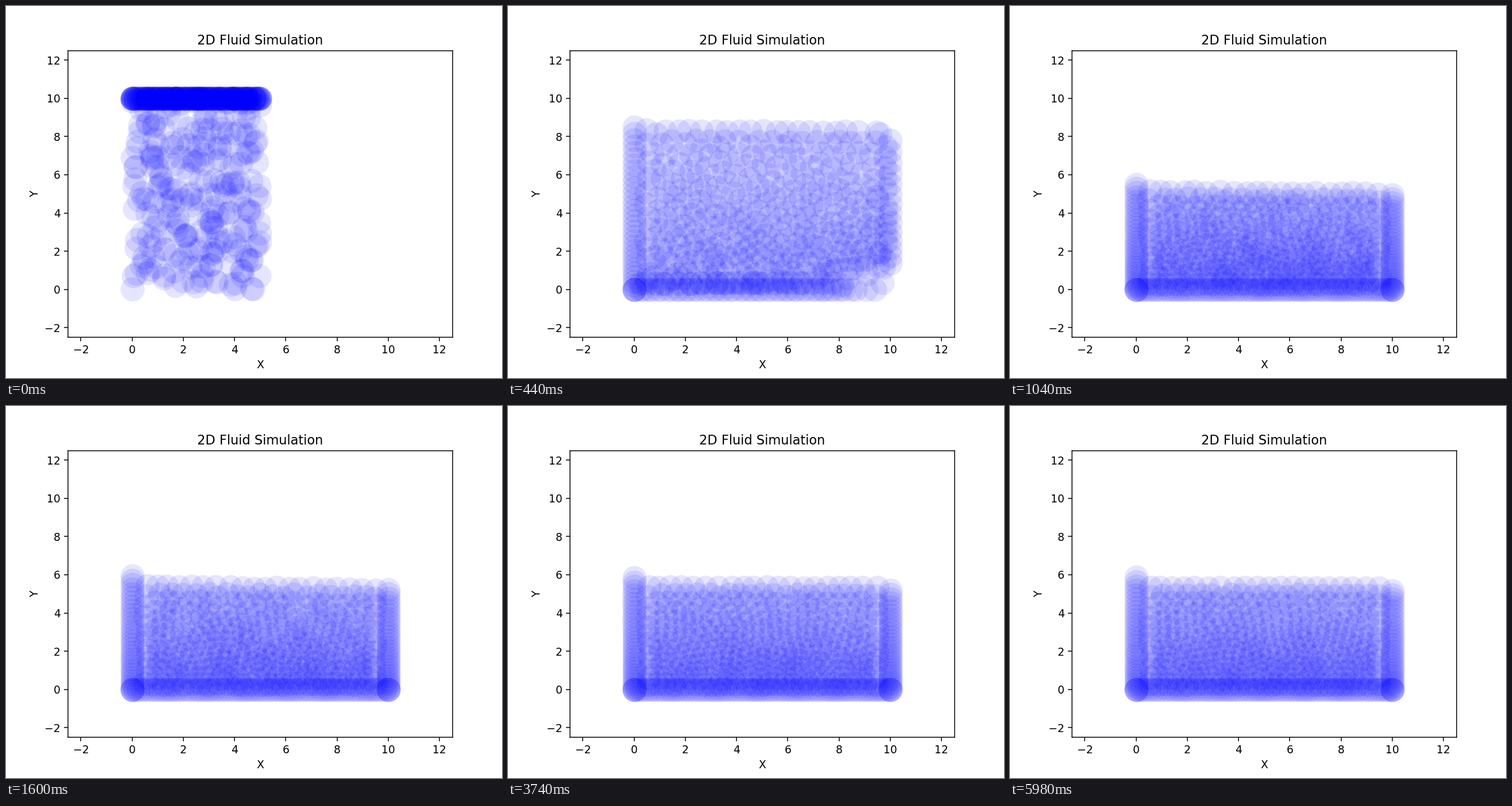
Animation of 864x648 px, one loop 6000 ms. Source, as a matplotlib script:

```python
import numpy as np
import matplotlib.pyplot as plt
from matplotlib.animation import FuncAnimation

FRAMES, INTERVAL = 300, 20
BURST = 11            # frames until the fluid has filled the tank
rng = np.random.default_rng(7)

# Heights over time: fluid surface at both sides, and the two wall columns.
TIMES = np.array([0, 11, 22, 35, 46, 62, 80, 138, 239, 299])
SURFACE_L = np.array([9.4, 9.3, 8.3, 6.4, 5.15, 5.55, 5.4, 5.35, 5.33, 5.32])
SURFACE_R = np.array([9.3, 9.3, 8.2, 5.75, 4.95, 5.4, 5.2, 5.3, 5.3, 5.3])
COLUMN_L = np.array([9.4, 9.25, 8.5, 6.46, 5.5, 5.85, 5.95, 5.86, 5.87, 5.87])
COLUMN_R = np.array([9.25, 9.25, 8.1, 5.45, 4.85, 5.35, 5.22, 5.14, 5.24, 5.17])


def curve(n, values):
    """Smooth cubic through the keyed heights."""
    slope = np.gradient(values, TIMES)
    i = min(np.searchsorted(TIMES, n, side="right") - 1, len(TIMES) - 2)
    h = TIMES[i + 1] - TIMES[i]
    t = (n - TIMES[i]) / h
    return ((2 * t**3 - 3 * t**2 + 1) * values[i]
            + (t**3 - 2 * t**2 + t) * h * slope[i]
            + (3 * t**2 - 2 * t**3) * values[i + 1]
            + (t**3 - t**2) * h * slope[i + 1])


def mix(a, b, w):
    return a + (b - a) * w


def bed(x):
    """Lower edge of the burst fluid, rising to the right."""
    return np.interp(x, [6.9, 8, 9, 10], [0.35, 1.75, 2.4, 2.5])


def relax(p, reach, confine, free, steps=80):
    """Push crowded particles apart; only the free ones move."""
    for _ in range(steps):
        d = p[:, None] - p
        r = np.hypot(d[..., 0], d[..., 1]) + 1e-9
        np.fill_diagonal(r, np.inf)
        push = np.clip(reach(p)[:, None] - r, 0, None) / r
        moved = confine(p + 0.15 * (d * push[..., None]).sum(axis=1))
        p = np.where(free[:, None], moved, p)
    return p


def make_bulk():
    rows = []
    heights = np.cumsum(np.linspace(0.3, 0.5, 13))
    counts = np.linspace(35, 20, 13).round().astype(int)
    for k, (y, count) in enumerate(zip(heights, counts)):
        x = np.linspace(0.6, 9.4, count) + (0.08 if k % 2 else -0.08)
        spread = mix(0.26, 0.06, (k / 12) ** 3)
        rows.append(np.column_stack([
            x + rng.uniform(-spread, spread, count),
            y + rng.uniform(-spread, spread, count)]))
    p = np.vstack(rows)
    return relax(p, lambda q: 0.38 + 0.03 * q[:, 1],
                 lambda q: np.clip(q, [0.55, 0.28], [9.45, 5.27]),
                 np.ones(len(p), bool))


bulk = make_bulk()
U, V = (bulk[:, 0] - 0.5) / 9, (bulk[:, 1] - 0.3) / 4.9
phase = rng.uniform(0, 2 * np.pi, (2, len(U)))
rate = rng.uniform(0.02, 0.06, (2, len(U)))

floor_u = np.linspace(0, 1, 76)
floor_lift = np.where(np.arange(76) % 3 == 1, rng.uniform(0.3, 1.2, 76), 0)
left_t = np.linspace(0, 1, 32)
right_t = np.linspace(0, 1, 30)
right_pull = np.where(np.arange(30) % 2 == 1, rng.uniform(0.2, 0.7, 30), 0)
right_drop = np.zeros(30)
right_pull[0], right_drop[0] = 0.75, 1.5
late = np.column_stack([rng.uniform(8, 9.4, 2), rng.uniform(3, 8, 2)])


def emptiness(n):
    """1 while the lower right is still empty, 0 once it is filled."""
    s = np.clip((n - BURST) / 20, 0, 1)
    return 1 - s * s * (3 - 2 * s)


def flow(n):
    w = emptiness(n)
    amp = 0.03 + 0.08 * np.exp(-n / 60)
    wave = amp * np.sin(phase + rate * n)
    x = 0.5 + 9 * (U - 0.18 * w * U * (1 - U)) + wave[0]
    base = mix(0.3, bed(x), w)
    top = mix(curve(n, SURFACE_L), curve(n, SURFACE_R), x / 10) - 0.06
    y = base + (top - base) * V + 0.6 * wave[1]

    floor_x = mix(10 * floor_u, 7.3 * floor_u + 1.3 * floor_u**40, w)
    floor_x = floor_x + 0.02 * np.sin(0.05 * n + 40 * floor_u)
    left_y = curve(n, COLUMN_L) * (0.75 * left_t + 0.25 * left_t**2)
    low = 2.3 * w
    right_y = low + (curve(n, COLUMN_R) - low) * (
        0.75 * right_t + 0.25 * right_t**2)

    return np.vstack([
        np.column_stack([x, y]),
        np.column_stack([floor_x, w * floor_lift]),
        np.column_stack([np.zeros(32), left_y]),
        np.column_stack([10 - w * right_pull, right_y - w * right_drop]),
        np.zeros((2, 2)),
        mix(np.array([10.0, 0.0]), late, w),
    ])


def burst_offset():
    """Shift that spreads the burst fluid evenly between the walls."""
    p = flow(BURST)
    x, y = p.T
    free = (x > 0.05) & (x < 9.99) & (y > 0.01) & (y > bed(x) - 0.9)

    def confine(q):
        qx = np.clip(q[:, 0], 0.4, 9.6)
        return np.column_stack([qx, np.clip(q[:, 1], bed(qx), 9.32)])

    spread = relax(p, lambda q: 0.42 + q @ [0.012, 0.014], confine, free)
    return spread - p


offset = burst_offset()


def pool(n):
    return np.clip(flow(n) + emptiness(n) * offset, 0, 10)


def banded(p, size=24):
    """Order particles by height bands, then left to right."""
    order = np.argsort(p[:, 1], kind="stable")
    return np.concatenate([
        chunk[np.argsort(p[chunk, 0], kind="stable")]
        for chunk in np.split(order, range(size, len(order), size))])


def make_start():
    """Half the drops fill the block, the rest lie along its lid."""
    filled = pool(BURST)
    k = np.arange(len(filled))
    drop = np.column_stack([5 * (0.7549 * k % 1), 20 * (0.5698 * k % 1)])
    drop += rng.normal(0, 0.22, drop.shape)
    drop = np.clip(drop, 0.02, [4.98, 10])
    start = np.empty_like(drop)
    start[banded(filled)] = drop[banded(drop)]
    return start


start = make_start()


def positions(n):
    p = pool(n)
    if n < BURST:
        p = mix(start, p, 1 - (1 - n / BURST) ** 1.7)
    return p


fig, ax = plt.subplots(figsize=(6.4, 4.8), dpi=135)
ax.set(xlim=(-2.5, 12.5), ylim=(-2.5, 12.5),
       title="2D Fluid Simulation", xlabel="X", ylabel="Y")
dots, = ax.plot([], [], "o", color="blue", alpha=0.1,
                markersize=22.36, markeredgecolor="none")


def update(n):
    dots.set_data(*positions(n).T)
    return dots,


anim = FuncAnimation(fig, update, frames=FRAMES, interval=INTERVAL,
                     repeat=True)
plt.show()
```
